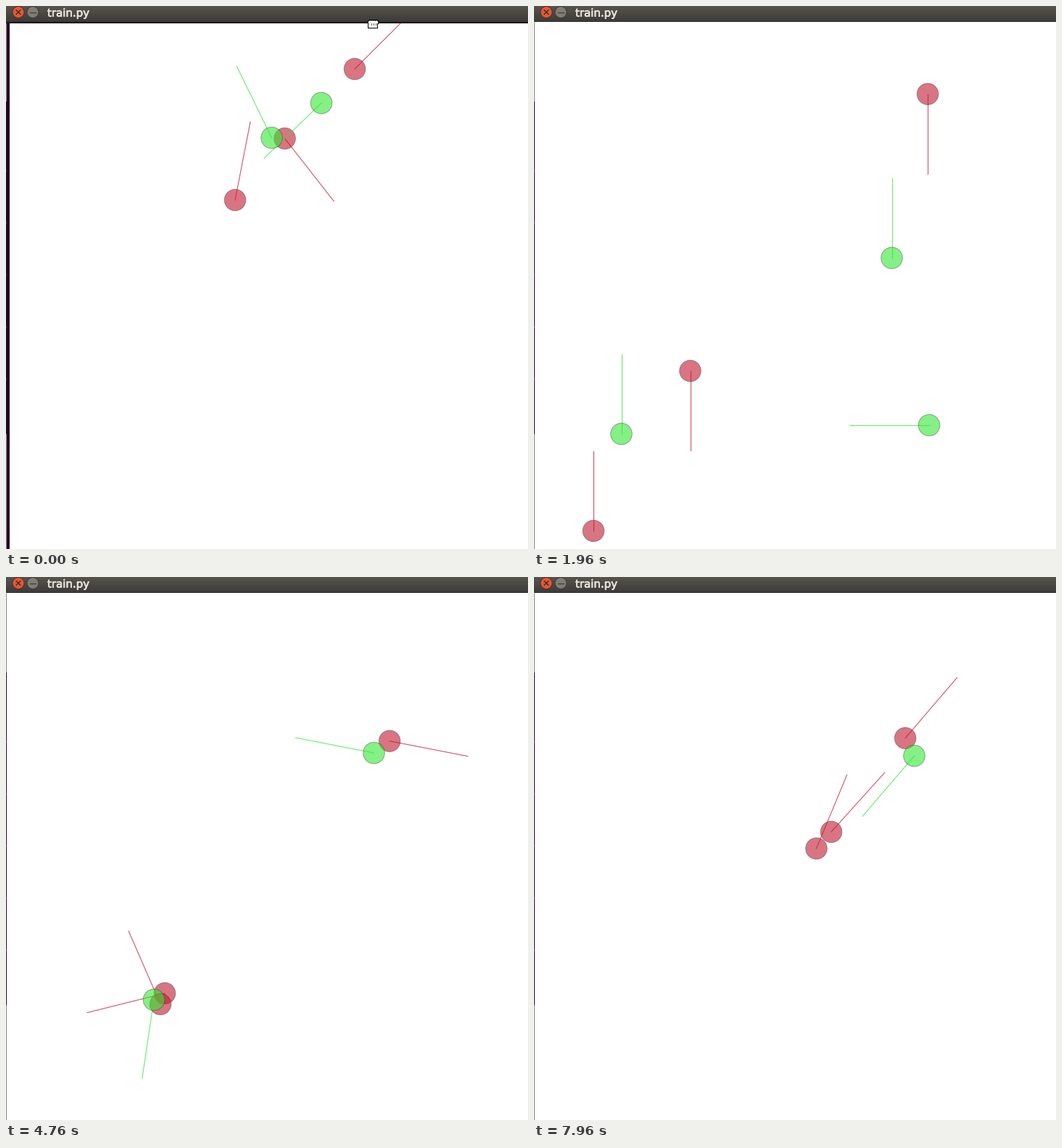
A matplotlib script that plays this animation: 720 px wide and 750 px high, repeating every 8000 ms.

```python
import numpy as np
import matplotlib.pyplot as plt
import matplotlib.patheffects as pe
from matplotlib.animation import FuncAnimation
from matplotlib.patches import Circle, Rectangle

W, H, DPI = 720, 750, 100
FRAMES, DT = 200, 40
LOOP = FRAMES * DT
PX = 72 / DPI
SPEED = 0.148              # px per ms
REACH, RADIUS = 110, 14.8
RESET, SETTLE = 1400, 120
RED, GREEN = "#c1192f", "#34e634"

STALLS = [(840, 80), (1240, 120), (2120, 80)]      # start, length in ms
MARKS = [0, 1120, 1960, 3040, 4760, 5920, 7960]    # times of the key poses


def moving_time(t):
    """Time without the moments in which the simulation hangs."""
    return t - sum(min(max(t - start, 0), length) for start, length in STALLS)


def ahead(a, dist):
    return dist * np.array([np.cos(a), -np.sin(a)])


def arc(a, turn, length, u):
    """Offset after part u of a path that turns evenly from heading a."""
    if abs(turn) < 1e-6:
        return ahead(a, length * u)
    b = a + turn * u
    return length / turn * np.array([np.sin(b) - np.sin(a), np.cos(b) - np.cos(a)])


class Agent:
    """Flies through key poses (x, y, heading in degrees), one per mark.

    Outside its poses it flies straight on. Where the next pose is near,
    it circles there at about spin degrees per ms.
    """

    def __init__(self, color, first, poses, spin=0.0, end=None):
        self.color, self.spin = color, spin
        early = MARKS[first] < RESET
        self.start = 0 if early else RESET
        self.end = end or (RESET if early else LOOP)
        self.times = [moving_time(t) for t in MARKS[first:first + len(poses)]]
        self.poses = [(np.array(p[:2], float), p[2]) for p in poses]

    def turn(self, p0, a0, p1, a1, span):
        d = (a1 - a0 + 180) % 360 - 180
        if np.hypot(*(p1 - p0)) < 0.5 * SPEED * span:
            d += 360 * round((self.spin * span - d) / 360)
        return np.radians(d)

    def at(self, t):
        s, times = moving_time(t), self.times
        for side in (0, -1):
            past = s - times[side]
            if past <= 0 if side == 0 else past >= 0:
                p, a = self.poses[side]
                a = np.radians(a)
                return p + ahead(a, SPEED * past), a
        i = np.searchsorted(times, s, side="right") - 1
        (p0, a0), (p1, a1) = self.poses[i:i + 2]
        span = times[i + 1] - times[i]
        u = (s - times[i]) / span
        turn, a = self.turn(p0, a0, p1, a1, span), np.radians(a0)
        drift = p1 - p0 - arc(a, turn, SPEED * span, 1)
        return p0 + arc(a, turn, SPEED * span, u) + u * drift, a + turn * u


def mirror(poses, cx=518.3, cy=234.8):
    return [(2 * cx - x, 2 * cy - y, a + 180) for x, y, a in poses]


# Two agents chase each other round one point, always opposite.
DUEL = [(493.5, 348, 90), (514, 220, 47), (507.5, 243, 169),
        (526, 239, 187), (524.5, 247, 229.5)]

AGENTS = [
    Agent(RED, 0, [(481, 87, 45), (440, 93, 249)], spin=0.2),
    Agent(RED, 0, [(316, 268, 79), (371, 152, -33)]),
    Agent(RED, 0, [(384.5, 183, -52)], end=320),
    Agent(GREEN, 0, [(435, 134, 224), (319, 193, 143)]),
    Agent(GREEN, 0, [(366.5, 182, 116)], end=320),
    Agent(RED, 2, mirror(DUEL), spin=-0.57),
    Agent(RED, 2, [(215.5, 504, -90), (150, 588, -123), (219, 575, 194),
                   (228.5, 545, 62), (410, 352, 48)], spin=-0.5),
    Agent(RED, 2, [(82, 725, 90), (95, 590, 75), (213, 590, 113.5),
                   (193, 560, 67), (389.5, 375, 67.5)], spin=-0.5),
    Agent(GREEN, 2, DUEL, spin=-0.57),
    Agent(GREEN, 2, [(545, 579, 180), (397, 579, 180), (204, 584, 261.5)], end=5000),
    Agent(GREEN, 2, [(120.5, 591, 90), (186, 508, 57.6)], end=3640),
]

fig = plt.figure(figsize=(W / DPI, H / DPI), dpi=DPI, facecolor="white")
ax = fig.add_axes([0, 0, 1, 1])
ax.axis("off")


def box(x, y, w, h, color, z=5):
    return ax.add_patch(Rectangle((x, y), w, h, fc=color, lw=0, zorder=z,
                                  antialiased=False))


def dot(x, y, r, z, **style):
    return ax.add_patch(Circle((x, y), r, zorder=z, **style))


def stroke(xs, ys, color, w, z=9):
    return ax.plot(xs, ys, color=color, lw=w * PX, zorder=z)[0]


def title_bar():
    ramp = np.linspace([86, 84, 77], [60, 59, 55], 22)[:, None] / 255
    ax.imshow(ramp, extent=(0, W, 22, 0), aspect="auto", zorder=6)
    box(0, 21, W, 1, "#33322e", 7)
    for x, face, rim in ((17, "#dd5a3c", "#5f2a1c"), (37, "#807d74", "#3a3935")):
        dot(x, 8.5, 8, 8, fc=face, ec=rim, lw=PX)
    for sign in (1, -1):
        stroke([14.2, 19.8], [8.5 - 2.8 * sign, 8.5 + 2.8 * sign], "#57200f", 1.4)
    stroke([33, 41], [8.5, 8.5], "#3f3d38", 1.3)
    ax.text(57, 14.5, "train.py", family="DejaVu Sans", size=15 * PX,
            color="#e3dfd6", va="baseline", zorder=9,
            path_effects=[pe.withStroke(linewidth=0.55, foreground="#e3dfd6")])


def left_edge():
    box(0, 23, 1, H - 23, "#8c8a88")
    box(0, 132, 1, 459, "#2a0a26", 6)
    for y in range(226, 540, 72):
        box(0, y, 1, 3, "#3a2c8c", 7)


def early_parts():
    """Dark strip and grabbing hand, seen only at the start."""
    parts = [box(1, 23, 4, H - 23, "#240320"), box(0, 22, W, 2, "#1d1a1b", 7)]
    for grow, color, z in ((1.3, "black", 10), (0, "white", 11)):
        parts.append(box(500 - grow, 23 - grow, 12 + 2 * grow, 7 + 2 * grow, color, z))
        parts += [dot(x, 22.5, 2.3 + grow, z, fc=color, lw=0) for x in (502, 505, 508, 511)]
    parts += [stroke([x, x], [24, 26], "#555555", 1, 12) for x in (504, 507, 510)]
    return parts


def body(agent, z):
    ray = stroke([], [], agent.color, 1.1, z)
    ray.set_alpha(0.75)
    return (dot(0, 0, RADIUS, z, fc=agent.color, lw=0, alpha=0.6),
            dot(0, 0, RADIUS, z, fc="none", ec="#303030", lw=0.9 * PX, alpha=0.45),
            ray)


title_bar()
left_edge()
early = early_parts()
bodies = [body(agent, 2 + k / 100) for k, agent in enumerate(AGENTS)]
ax.set_xlim(0, W)
ax.set_ylim(H, 0)


def draw(i):
    t = i * DT
    for part in early:
        part.set_visible(t < SETTLE)
    for agent, parts in zip(AGENTS, bodies):
        alive = agent.start <= t < agent.end
        for part in parts:
            part.set_visible(alive)
        if alive:
            pos, a = agent.at(t)
            tip = pos + ahead(a, REACH)
            disc, rim, ray = parts
            disc.center = rim.center = tuple(pos)
            ray.set_data([pos[0], tip[0]], [pos[1], tip[1]])
    return []


anim = FuncAnimation(fig, draw, frames=FRAMES, interval=DT, repeat=True,
                     repeat_delay=0, init_func=lambda: draw(0))
plt.show()
```
